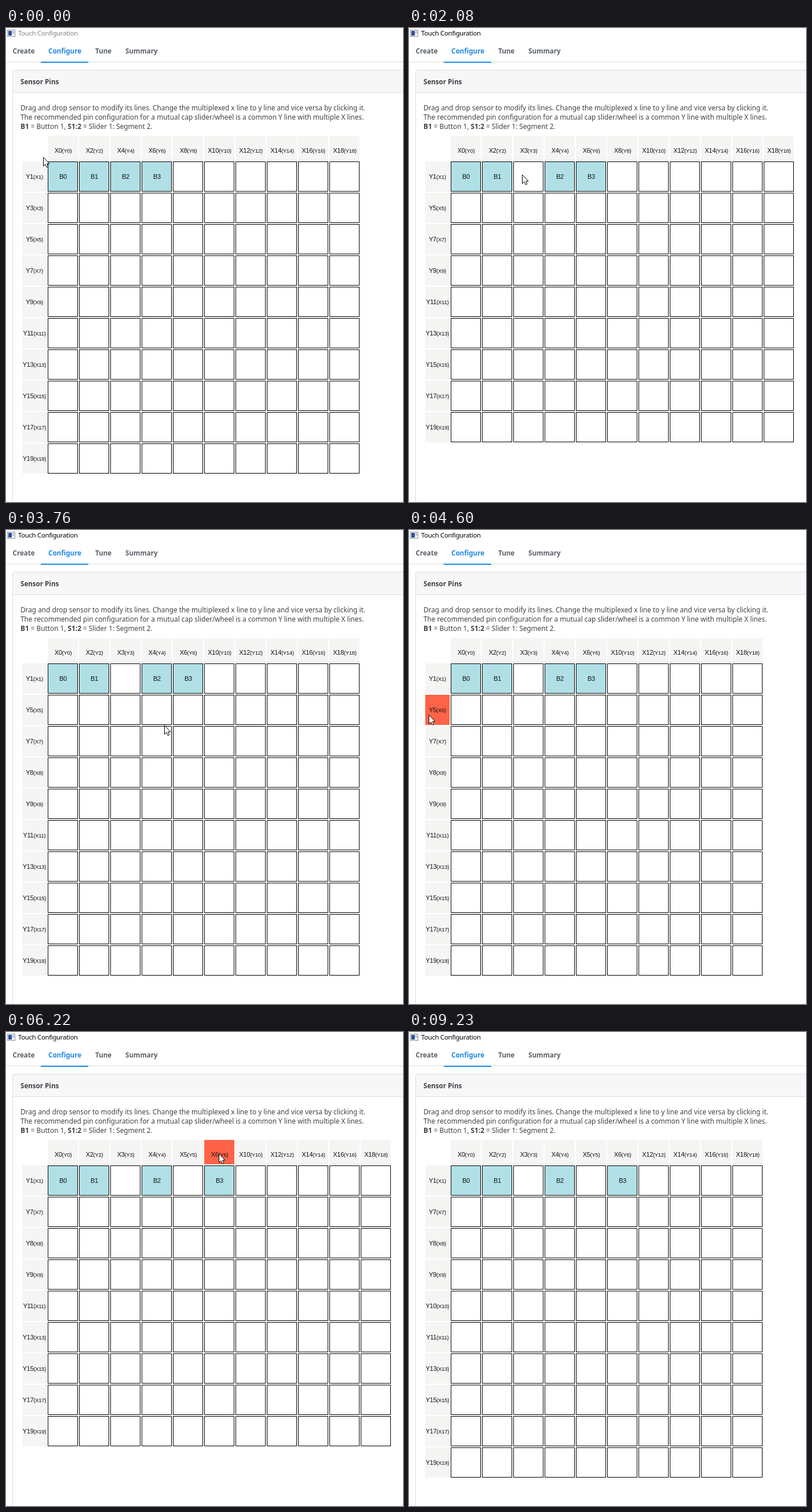
These frames come from a looping animation (685x817 px, 9.96 s). An HTML page:

```html
<!DOCTYPE html>
<html lang="en">
<head>
<meta charset="utf-8">
<title>Touch Configuration</title>
<style>
  html, body { margin: 0; width: 100%; height: 100%; overflow: hidden; background: #fff; }
  svg { display: block; }
  .ui { font: 11.8px "Noto Sans", "Open Sans", sans-serif; fill: #3d4249; }
  .tab { font-weight: 600; font-size: 11.6px; fill: #5b6168; }
  .on { fill: #1e88e5; }
  .head { font-weight: 600; font-size: 11.6px; }
  .bold { font-weight: 700; }
  .bar { font: 11.3px "Noto Sans", "Open Sans", sans-serif; letter-spacing: -.27px; }
  #grid { font: 11px "Liberation Sans", Arial, sans-serif; letter-spacing: -.3px; fill: #111; text-anchor: middle; }
  #grid tspan { font-size: 9.5px; }
</style>
</head>
<body>
<svg width="685" height="817" viewBox="0 0 685 817">
  <g shape-rendering="crispEdges">
    <rect x="2" y="3" width="14" height="12" fill="#8d939c"/>
    <rect x="3" y="4" width="12" height="10" fill="#f4f6f9"/>
    <rect x="4" y="5" width="6" height="8" fill="#2f4f9c"/>
    <rect x="11" y="5" width="3" height="5" fill="#b9c3d3"/>
    <rect y="58" width="685" height="1" fill="#dcdcdc"/>
    <rect x="60" y="58" width="82" height="2" fill="#1e88e5"/>
  </g>
  <rect x="11.5" y="72.5" width="720" height="800" rx="3" fill="#fff" stroke="#dcdcdc"/>
  <path d="M12 111V76a3 3 0 0 1 3-3H685V111Z" fill="#f7f7f7"/>
  <path d="M12 111.5H685" stroke="#dcdcdc"/>
  <text id="title" class="bar" x="21" y="13">Touch Configuration</text>
  <g class="ui">
    <text class="tab" x="11.5" y="44">Create</text>
    <text class="tab on" x="73" y="44">Configure</text>
    <text class="tab" x="154" y="44">Tune</text>
    <text class="tab" x="206" y="44">Summary</text>
    <text class="head" x="25" y="96.5">Sensor Pins</text>
    <text x="25" y="142">Drag and drop sensor to modify its lines. Change the multiplexed x line to y line and vice versa by clicking it.</text>
    <text x="25" y="158">The recommended pin configuration for a mutual cap slider/wheel is a common Y line with multiple X lines.</text>
    <text x="25" y="174"><tspan class="bold">B1</tspan> = Button 1, <tspan class="bold">S1:2</tspan> = Slider 1: Segment 2.</text>
  </g>
  <g id="grid"></g>
  <g id="cursor" stroke-linejoin="round">
    <path id="arrow" d="M.5 .8V16.2L4 12.9 6.3 18.2 8.8 17.1 6.6 12H11Z" fill="#fff" stroke="#000"/>
    <g id="hand" fill="#fff" stroke="#000">
      <path d="M-1 1.5Q-1 0 .5 0T2 1.5V7Q4.5 5.8 5.2 7.6 7.5 6.6 8.2 8.6 11 7.8 11 10.5V14Q11 16 9.5 18V21H1V18.5L-5 11.5Q-5.5 9.5-3.5 9.5L-1 12Z"/>
      <path d="M2 7V11M5.2 7.6V11.5M8.2 8.6V12" fill="none"/>
    </g>
    <circle id="ring" r="9" fill="none" stroke="#2a9be8" stroke-width="4"/>
  </g>
</svg>
<script>
const LOOP = 9960, EXIT = 9230, STEP = 68;
const LEFT = 72, TOP = 230, PITCH = 54, SIZE = 52;
const HEAD_X = 28, HEAD_Y = 186, HEAD = 42;
const $ = id => document.getElementById(id);

const clicks = [
  { press: 870, release: 940, pin: 3 },
  { press: 3090, release: 3220, pin: 8 },
  { press: 4930, release: 5000, pin: 5 },
  { press: 6560, release: 6640, pin: 10 }
];

// each move is a quadratic curve from where the last one ended
const home = [64, 222];
const moves = [
  { from: 70, until: 270, bend: [52, 270], to: [31, 321] },
  { from: 470, until: 470, bend: [33, 320], to: [35, 318] },
  { from: 1730, until: 2560, bend: [210, 235], to: [379, 202] },
  { from: 3620, until: 4600, bend: [90, 605], to: [34, 318] },
  { from: 5600, until: 6360, bend: [320, 185], to: [436, 213] },
  { from: 8960, until: 9230, bend: [566, 255], to: [697, 298] }
];

function pointer(t) {
  let pos = home;
  for (const { from, until, bend, to } of moves) {
    if (t < from) break;
    const last = Math.round((until - from) / STEP);
    const step = t >= until ? last : Math.floor((t - from) / (until - from) * last);
    const p = (step + 1) / (last + 1), q = 1 - p;
    pos = pos.map((v, i) => Math.round(q * q * v + 2 * p * q * bend[i] + p * p * to[i]));
  }
  return pos;
}

// even pins are columns and odd pins are rows until a click flips them
function lines(state) {
  const flipped = clicks.slice(0, state).map(c => c.pin);
  const cols = [], rows = [];
  for (let pin = 0; pin < 20; pin++)
    ((pin % 2 === 0) !== flipped.includes(pin) ? cols : rows).push(pin);
  return { cols, rows };
}

const isButton = pin => pin % 2 === 0 && pin < 8;

const slot = (v, start, count) => {
  const i = Math.floor((v - start) / PITCH);
  return i >= 0 && i < count && v - start - i * PITCH < SIZE ? i : -1;
};

function headerAt([x, y], { cols, rows }) {
  const c = slot(x, LEFT, cols.length), r = slot(y, TOP, rows.length);
  if (y >= HEAD_Y && y < HEAD_Y + HEAD && c >= 0) return 'c' + c;
  if (x >= HEAD_X && x < HEAD_X + HEAD && r >= 0) return 'r' + r;
  return '';
}

const rect = (x, y, w, h, fill, extra = '') =>
  `<rect x="${x}" y="${y}" width="${w}" height="${h}" fill="${fill}" ${extra}/>`;
const label = (x, y, a, b, pin) =>
  `<text x="${x}" y="${y}">${a}${pin}<tspan>(${b}${pin})</tspan></text>`;

function gridMarkup({ cols, rows }, hover) {
  const fill = key => key === hover ? '#ff6347' : '#f5f5f4';
  const mid = SIZE / 2;
  let out = '';
  cols.forEach((pin, c) => {
    const x = LEFT + c * PITCH;
    out += rect(x, HEAD_Y, SIZE, HEAD, fill('c' + c)) + label(x + mid + .5, 215, 'X', 'Y', pin);
  });
  rows.forEach((pin, r) => {
    const y = TOP + r * PITCH, base = y + mid + 4;
    out += rect(HEAD_X, y, HEAD, SIZE, fill('r' + r)) + label(HEAD_X + HEAD / 2, base, 'Y', 'X', pin);
    cols.forEach((col, c) => {
      const x = LEFT + c * PITCH, button = r === 0 && isButton(col);
      out += rect(x + .5, y + .5, SIZE - 1, SIZE - 1, button ? '#b0e0e6' : '#fff', 'stroke="#000"');
      if (button) out += `<text x="${x + mid + .5}" y="${base}">B${col / 2}</text>`;
    });
  });
  return out;
}

const show = (id, on) => $(id).setAttribute('visibility', on ? 'visible' : 'hidden');
let drawn = '';

function draw(t) {
  const state = clicks.filter(c => t >= c.release).length;
  const layout = lines(state), pos = pointer(t);
  // the header just clicked stays plain until the pointer reaches another one
  const last = clicks[state - 1];
  const stale = last ? headerAt(pointer(last.press), layout) : '';
  const over = headerAt(pos, layout), hover = over === stale ? '' : over;
  const key = state + hover;
  if (key !== drawn) {
    $('grid').innerHTML = gridMarkup(layout, hover);
    drawn = key;
  }

  const col = layout.cols[slot(pos[0], LEFT, layout.cols.length)];
  const onButton = slot(pos[1], TOP, 1) === 0 && isButton(col);
  const busy = clicks.some(c => t >= c.press && t < c.release);
  const seen = t < EXIT;
  $('cursor').setAttribute('transform', `translate(${pos})`);
  show('ring', seen && busy);
  show('hand', seen && !busy && onButton);
  show('arrow', seen && !busy && !onButton);
  $('title').setAttribute('fill', t < clicks[0].press ? '#858585' : '#000');
}

const start = performance.now();
function tick() {
  draw((performance.now() - start) % LOOP);
  requestAnimationFrame(tick);
}
tick();
</script>
</body>
</html>
```
